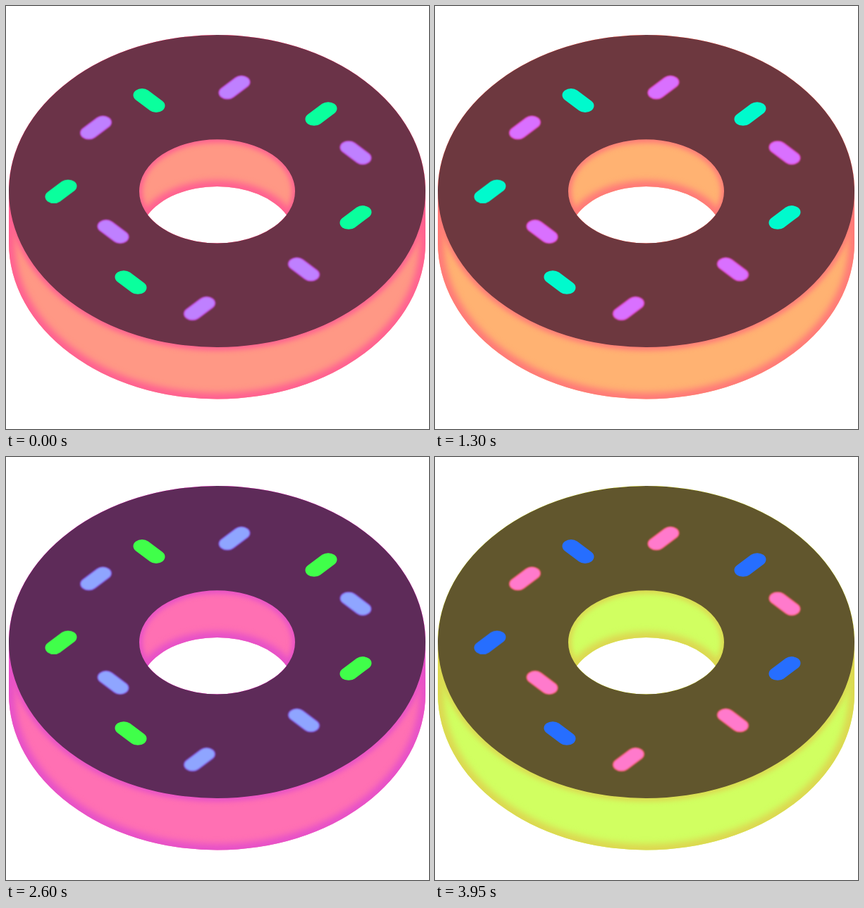
An HTML page for the animation above (4000 ms loop, 600 by 600 pixels).

```html
<!DOCTYPE html>
<html lang="en">
<head>
<meta charset="utf-8">
<title>Doughnut</title>
<style>
  html, body { margin: 0; width: 100%; height: 100%; overflow: hidden; background: #fff; }
  svg { display: block; width: 100vw; height: 100vh; }
  .body { fill: var(--body); }
  .rim { fill: none; stroke: var(--edge); }
  .icing { fill: var(--icing); fill-rule: evenodd; }
  .halo { stroke: var(--halo); stroke-width: 25; }
  .cool { stroke: var(--cool); stroke-width: 25; }
  .warm { stroke: var(--warm); stroke-width: 23; }
  #sprinkles { stroke-linecap: round; }
</style>
</head>
<body>
<svg viewBox="0 0 600 600">
  <defs>
    <path id="shell" d="M4 262.5A295.5 221.5 0 0 1 595 262.5V336A295.5 221.5 0 0 1 4 336Z
      M201 296.2A110.5 73.5 0 0 1 398 296.2A110.5 73.5 0 0 1 201 296.2Z"/>
    <path id="top" d="M4 262.5A295.5 221.5 0 0 1 595 262.5A295.5 221.5 0 0 1 4 262.5Z
      M189 262.8A110.5 73.5 0 0 1 410 262.8A110.5 73.5 0 0 1 189 262.8Z"/>
    <clipPath id="cut"><use href="#shell" clip-rule="evenodd"/></clipPath>
    <filter id="wide" filterUnits="userSpaceOnUse" x="-30" y="0" width="660" height="600" color-interpolation-filters="sRGB">
      <feGaussianBlur stdDeviation="5"/>
    </filter>
    <filter id="narrow" filterUnits="userSpaceOnUse" x="-30" y="0" width="660" height="600" color-interpolation-filters="sRGB">
      <feGaussianBlur stdDeviation="3.5"/>
    </filter>
    <filter id="soft" filterUnits="userSpaceOnUse" x="-30" y="-30" width="660" height="860" color-interpolation-filters="sRGB">
      <feGaussianBlur stdDeviation="1.3"/>
    </filter>
  </defs>
  <g clip-path="url(#cut)">
    <rect class="body" width="600" height="600"/>
    <use href="#shell" class="rim" stroke-width="17" filter="url(#wide)"/>
    <use href="#top" class="rim" stroke-width="9" filter="url(#narrow)"/>
    <use href="#top" class="icing"/>
  </g>
  <g id="sprinkles"></g>
</svg>
<script>
const LOOP = 4000, STEP = 50;
const PARTS = ['body', 'edge', 'icing', 'warm', 'cool', 'halo'];

// Hue offset in degrees, then one colour per part.
const PALETTE = [
  [-100, '#fc66f5', '#b055f0', '#4a2b5f', '#80d4ff', '#90ff1e', '#5050c8'],
  [-82, '#ff64cd', '#c850dc', '#572b5e', '#78bfff', '#66ff28', '#5f50d2'],
  [-73, '#ff6bb9', '#dc4bd2', '#5c2b5c', '#85adff', '#46ff40', '#7846d2'],
  [-70, '#ff70b3', '#e650c8', '#5e2b59', '#8fa5ff', '#40ff4a', '#8046d2'],
  [-34, '#ff9885', '#ff5f91', '#6b3348', '#bf80ff', '#0aff9d', '#c33ccd'],
  [-15, '#ffb272', '#ff7878', '#6d383f', '#d970ff', '#00facd', '#dc3cb4'],
  [0, '#ffd166', '#ffa05f', '#6d4337', '#fc70ff', '#00c8ff', '#eb4696'],
  [18, '#fff763', '#ffc85a', '#694c32', '#ff70e0', '#0096ff', '#eb4673'],
  [36, '#d1ff61', '#dcd750', '#61562d', '#ff7acc', '#266eff', '#eb5a5a']
].map(([at, ...colors]) => ({ at, colors: colors.map(parse) }));

// Time in ms, hue offset.
const DRIFT = [[0, -34], [580, -96], [800, -82], [1300, -15], [1775, 4], [2000, 0],
  [2600, -70], [2940, -97], [3300, -73], [3950, 36]];

// Centre x, centre y, tilt (1 rises to the right, -1 falls).
const WARM = [[324, 115.5, 1], [127.5, 172.5, 1], [496, 208, -1],
  [152, 320, -1], [422.5, 373.5, -1], [274.5, 429, 1]];
const COOL = [[203, 134, -1], [447, 153, 1], [78, 263, 1], [496, 300, 1], [177, 392, -1]];

function parse(hex) {
  return [1, 3, 5].map(i => parseInt(hex.slice(i, i + 2), 16));
}

function capsule([x, y, tilt], kind, filter = '') {
  return `<path class="${kind}" transform="translate(${x} ${y}) scale(1 .75)" ` +
    `d="M-10 ${10 * tilt}L10 ${-10 * tilt}" ${filter}/>`;
}

const blur = 'filter="url(#soft)"';
document.getElementById('sprinkles').innerHTML =
  `<g ${blur}>${WARM.map(s => capsule(s, 'halo')).join('')}</g>` +
  `<g ${blur}>${WARM.map(s => capsule(s, 'warm')).join('')}</g>` +
  COOL.map(s => capsule(s, 'cool')).join('');

function slope(i) {
  const inner = DRIFT[i - 1] && DRIFT[i + 1];
  if (inner && (DRIFT[i][1] - DRIFT[i - 1][1]) * (DRIFT[i + 1][1] - DRIFT[i][1]) <= 0) return 0;
  const a = DRIFT[Math.max(i - 1, 0)], b = DRIFT[Math.min(i + 1, DRIFT.length - 1)];
  return (b[1] - a[1]) / (b[0] - a[0]);
}

// Cubic Hermite curve through the drift points.
function hueAt(t) {
  let i = 0;
  while (i < DRIFT.length - 2 && t > DRIFT[i + 1][0]) i++;
  const [t0, v0] = DRIFT[i], [t1, v1] = DRIFT[i + 1];
  const d = t1 - t0, u = (t - t0) / d, w = 1 - u;
  return v0 * w * w * (1 + 2 * u) + v1 * u * u * (3 - 2 * u) +
    d * u * w * (slope(i) * w - slope(i + 1) * u);
}

function paint(hue) {
  let i = 0;
  while (i < PALETTE.length - 2 && hue > PALETTE[i + 1].at) i++;
  const a = PALETTE[i], b = PALETTE[i + 1];
  const u = (hue - a.at) / (b.at - a.at);
  PARTS.forEach((part, p) => {
    const rgb = a.colors[p].map((c, k) => Math.round(c + (b.colors[p][k] - c) * u));
    document.documentElement.style.setProperty('--' + part, `rgb(${rgb})`);
  });
}

let start = null;
function frame(now) {
  if (start === null) start = now;
  const t = Math.max(0, now - start) % LOOP;
  paint(hueAt(Math.floor(t / STEP) * STEP));
  requestAnimationFrame(frame);
}
paint(hueAt(0));
requestAnimationFrame(frame);
</script>
</body>
</html>
```
